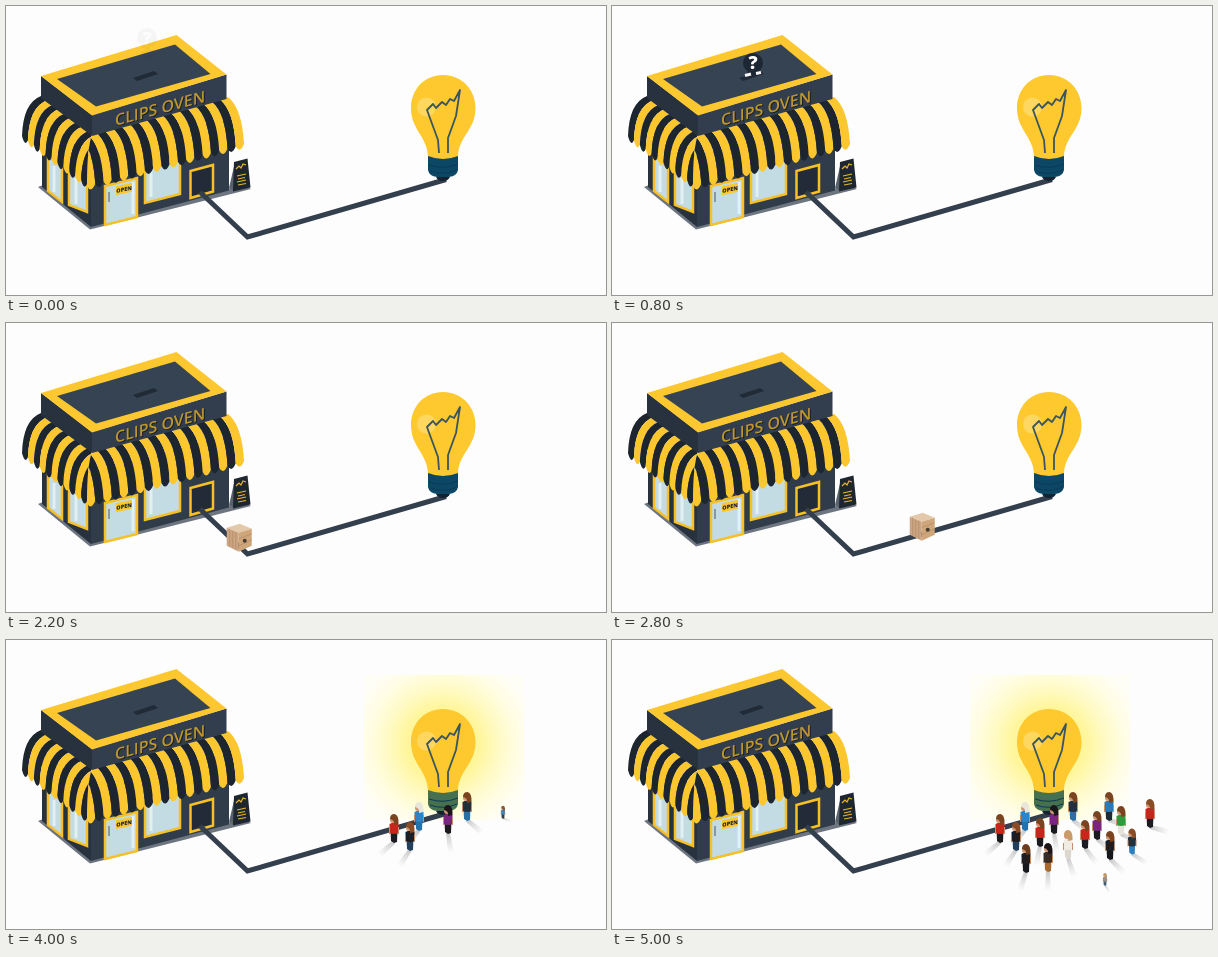
Write an HTML page that moves like this. It is 600 px wide and 289 px high and loops after 5100 ms.

```html
<!DOCTYPE html>
<html lang="en">
<head>
<meta charset="utf-8">
<title>Idea shop</title>
<style>
html, body { margin: 0; width: 100%; height: 100%; overflow: hidden; background: #fefdfe; }
svg { display: block; width: 100vw; height: 100vh; }
text { font-family: "Open Sans", Arial, sans-serif; }
</style>
</head>
<body>
<svg viewBox="0 0 600 289">
  <defs>
    <radialGradient id="halo" gradientUnits="userSpaceOnUse" cx="437" cy="104" r="92">
      <stop offset="0" stop-color="#fff284"/>
      <stop offset=".4" stop-color="#fff69c"/>
      <stop offset=".6" stop-color="#fffac4"/>
      <stop offset=".8" stop-color="#fffde2"/>
      <stop offset="1" stop-color="#fffef6"/>
    </radialGradient>
    <linearGradient id="shade">
      <stop offset="0" stop-color="#777" stop-opacity=".4"/>
      <stop offset="1" stop-color="#999" stop-opacity="0"/>
    </linearGradient>
    <clipPath id="slot"><path d="M100 0H180V60L152 67.5 128 74 100 80Z"/></clipPath>
    <clipPath id="leftSide"><path d="M86 128Q81 143 81 177V200H0V60H86Z"/></clipPath>
    <clipPath id="frontSide"><path d="M86 128Q81 143 81 177V200H300V60H86Z"/></clipPath>
  </defs>

  <!-- shop -->
  <path d="M32 181L84 223.500 245 183 240 180 213 184 60 170Z" fill="#6d7680"/>
  <path d="M36 110L85 150V221L36 181Z" fill="#28323f"/>
  <path d="M85 150L223 112V184.500L85 221Z" fill="#303c4a"/>
  <g stroke="#f6c026" stroke-width="2.500" fill="#c3dbe2">
    <path d="M42 150L56 161V196L42 185Z"/>
    <path d="M63 164L81 178V206L63 199Z"/>
    <path d="M99 180L131 172V211L99 219Z"/>
    <path d="M139 160L174 151V188L139 197Z"/>
    <path d="M184.500 165L207 159V185.500L184.500 192Z" fill="#222b37"/>
  </g>
  <path d="M48 160V186M70 172V198M145 165V191M127 176V208" stroke="#e2f0f3" stroke-width="3"/>
  <path d="M103 186V196" stroke="#8798a2" stroke-width="2"/>
  <g transform="translate(118 183) skewY(-12)">
    <rect x="-8" y="-4.500" width="16" height="9" fill="#fbc72e"/>
    <text y="2.300" font-size="5.500" font-weight="800" text-anchor="middle" fill="#1c232c">OPEN</text>
  </g>
  <path d="M229 156L223 182 228 185Z" fill="#59636d"/>
  <path d="M228 156L241.500 152.500 244.500 181.500 227 185.500Z" fill="#1e2630"/>
  <path d="M230 163l3-3 2 2 2-4 3 1M231 170l9-2M232 173l7-1.500M231 176l9-2M232 179l8-1.500" stroke="#e8b52b" stroke-width="1.200" fill="none"/>

  <g id="left" clip-path="url(#leftSide)"></g>
  <g id="front" clip-path="url(#frontSide)"></g>
  <path d="M35 70L86 109V130L35 92Z" fill="#28323f"/>
  <path d="M86 109L220.500 68.500V93L86 130Z" fill="#323e4d"/>
  <path d="M35 70L170.500 29 220.500 68.500 86 109.500Z" fill="#fdc82f"/>
  <path d="M51 73L169 38.500 204.500 68 90 100.500Z" fill="#364352"/>
  <path d="M127 72L148 65 152 68 131 75Z" fill="#212b37"/>
  <g transform="translate(109 120) skewY(-15)" font-size="16" font-weight="600">
    <text x="1" y="1" fill="#171e27">CLIPS OVEN</text>
    <text fill="#bd962e">CLIPS OVEN</text>
  </g>

  <g clip-path="url(#slot)">
    <g id="query">
      <path d="M-5 6H6L8 23H-8Z" fill="#1d2733"/>
      <circle r="10" fill="#1d2733"/>
      <path d="M-8 12.500l6-1.500M3 10.500l5-1" stroke="#f4f4f4" stroke-width="3"/>
      <text y="6.500" font-size="18" font-weight="800" text-anchor="middle" fill="#fff">?</text>
    </g>
  </g>

  <rect id="glow" x="358" y="35" width="160" height="145" fill="url(#halo)"/>
  <path d="M194 186L241.500 231 440 173.500" fill="none" stroke="#343f4d" stroke-width="5"/>

  <!-- bulb -->
  <g id="base" fill="#0c4766">
    <path d="M422 148H452V164Q451 170 443 171Q442 175 437 175Q432 175 431 171Q423 170 422 164Z"/>
    <path d="M423 159Q437 164 452 158M424 165Q437 170 451 164" fill="none" stroke="#0a3a56" stroke-width="1"/>
    <path d="M430 171H444Q442 175 437 175Q432 175 430 171Z" fill="#15222f"/>
  </g>
  <path d="M437 69C456 69 469.500 84 469.500 102C469.500 124 453 130 452 150Q437 156 422 150C421 130 405 124 405 102C405 84 418 69 437 69Z" fill="#fdc92e"/>
  <circle cx="420.500" cy="101" r="9.500" fill="#fdd75f"/>
  <path d="M433 147L432 134 421 104 427 98 430 102 436 96 440 99 444 93 448 95 454 84 450 110 442 132 442 147" fill="none" stroke="#3a5460" stroke-width="1.800" stroke-linejoin="round"/>

  <g id="box">
    <path d="M-12-10L1-14 13-9 0-5Z" fill="#e3c9aa"/>
    <path d="M-12-10L0-5V14L-12 8Z" fill="#cba583"/>
    <path d="M0-5L13-9V8L0 14Z" fill="#cfa67a"/>
    <path d="M-9-9V9M-6-7V10M-3-6V12M0 1L13-4M0 8L13 2" stroke="#b58d69" stroke-width=".8"/>
    <circle cx="6" cy="3" r="2" fill="#4a3a2c"/>
  </g>

  <g id="crowd"></g>
</svg>
<script>
const $ = id => document.getElementById(id);
const clamp = v => Math.max(0, Math.min(1, v));
const mix = (a, b, k) => a + (b - a) * k;
const at = (p, q, k) => [mix(p[0], q[0], k), mix(p[1], q[1], k)];
const add = (p, q) => [p[0] + q[0], p[1] + q[1]];

// Parallel stripes hung from the edge a-b; bulge and drop are offsets from it.
function awning(a, b, bulge, drop, count, dark) {
  let out = '';
  for (let i = 0; i < count; i++) {
    const l = at(a, b, i / count), r = at(a, b, (i + 1) / count);
    const dip = add(at(l, r, .5), [drop[0], drop[1] + 9]);
    const fill = i % 2 === dark ? '#1d252f' : '#fcc62e';
    out += `<path fill="${fill}" d="M${l}Q${add(l, bulge)} ${add(l, drop)}Q${dip} ${add(r, drop)}Q${add(r, bulge)} ${r}Z"/>`;
  }
  return out;
}
$('left').innerHTML = awning([35, 90], [100, 138], [-18, 7], [-19, 40], 11, 0);
$('front').innerHTML = awning([65, 133], [222, 91], [14, 11], [16, 47], 19, 1);

// x, foot y, top, hair, legs; in order of arrival
const folk = [
  [388, 202, '#c8261d', '#7a4420', '#1b1b22'],
  [413, 190, '#2a86c8', '#e9e6dc', '#2472ad'],
  [404, 210, '#1d1d22', '#8a4c24', '#23415c'],
  [442, 193, '#7a2580', '#1d1618', '#1c1a1e'],
  [461, 180, '#22303c', '#7a4420', '#2b70a4'],
  [497, 180, '#2b79b5', '#7a4420', '#1e2a36'],
  [414, 232, '#1d1d22', '#6b3c1e', '#17181c'],
  [436, 231, '#3a2c22', '#1d1618', '#a86a2c'],
  [428, 206, '#c8261d', '#7a4420', '#1b1b22'],
  [456, 218, '#f0ece4', '#c99b68', '#ddd8cf'],
  [473, 208, '#c8261d', '#7a4420', '#1b1b22'],
  [485, 199, '#7a2580', '#7a4420', '#1c1a1e'],
  [509, 194, '#2f9a3c', '#7a4420', '#e6e2da'],
  [538, 187, '#c8261d', '#8a4c24', '#1b1b22'],
  [498, 219, '#1d1d22', '#7a4420', '#17181c'],
  [520, 214, '#22303c', '#8a4c24', '#2b80bd'],
  [493, 247, '#8c8378', '#b98a52', '#2c4a66']
].map((p, i) => ({
  p, start: i < 5 ? 3620 + 40 * i : 3910 + 91 * (i - 5)
}));

function person([x, y, top, hair, legs]) {
  const turn = Math.atan2(Math.max(y - 160, 14), x - 437) * 180 / Math.PI;
  return `<g><path d="M0-2L20-3V3L0 2Z" fill="url(#shade)" transform="rotate(${turn})"/>
    <path d="M-3.500-12H3.500L3 0 0 1-3-1Z" fill="${legs}"/>
    <path d="M-4.500-18Q0-21 4.500-18L4.500-9Q0-7-4.500-9Z" fill="${top}"/>
    <path d="M-4.500-15V-8M4.500-15V-8" stroke="#c98f66" stroke-width="1"/>
    <circle cx="-1" cy="-22" r="3" fill="#cf9670"/>
    <path d="M-4-23Q-4-28 .500-28Q5-27 4.500-18L0-17Q1-22-4-23Z" fill="${hair}"/></g>`;
}
folk.sort((a, b) => a.p[1] - b.p[1]);
$('crowd').innerHTML = folk.map(f => person(f.p)).join('');
folk.forEach((f, i) => f.el = $('crowd').children[i]);

const door = [195, 177.5], bend = [242, 224], goal = [425, 169];
const place = (el, x, y, s = 1) => el.setAttribute('transform', `translate(${x} ${y}) scale(${s})`);
const fade = (el, v) => el.setAttribute('opacity', clamp(v));

function draw(t) {
  const sink = clamp((t - 400) / 700);
  place($('query'), 141, 32 + 50 * Math.pow(sink, 1.24));
  fade($('query'), t < 1200 ? .03 + t / 300 : 0);

  const pos = t < 2330
    ? at(door, bend, clamp((t - 1670) / 660))
    : at(bend, goal, clamp((t - 2330) / 1270));
  place($('box'), ...pos);
  fade($('box'), t < 2000 ? (t - 1400) / 250 : (3700 - t) / 240);

  const lit = clamp((t - 3620) / 230);
  fade($('glow'), lit);
  $('base').setAttribute('fill', `rgb(${mix(12, 70, lit)},${mix(71, 112, lit)},${mix(102, 78, lit)})`);

  for (const { p, start, el } of folk) {
    const s = clamp((t - start) / 200);
    place(el, p[0], p[1] - 3 * (1 - s), s);
    fade(el, s * 2);
  }
}

// The picture advances ten times a second.
function tick() {
  draw(Math.floor(performance.now() % 5100 / 100) * 100);
  requestAnimationFrame(tick);
}
tick();
</script>
</body>
</html>
```
